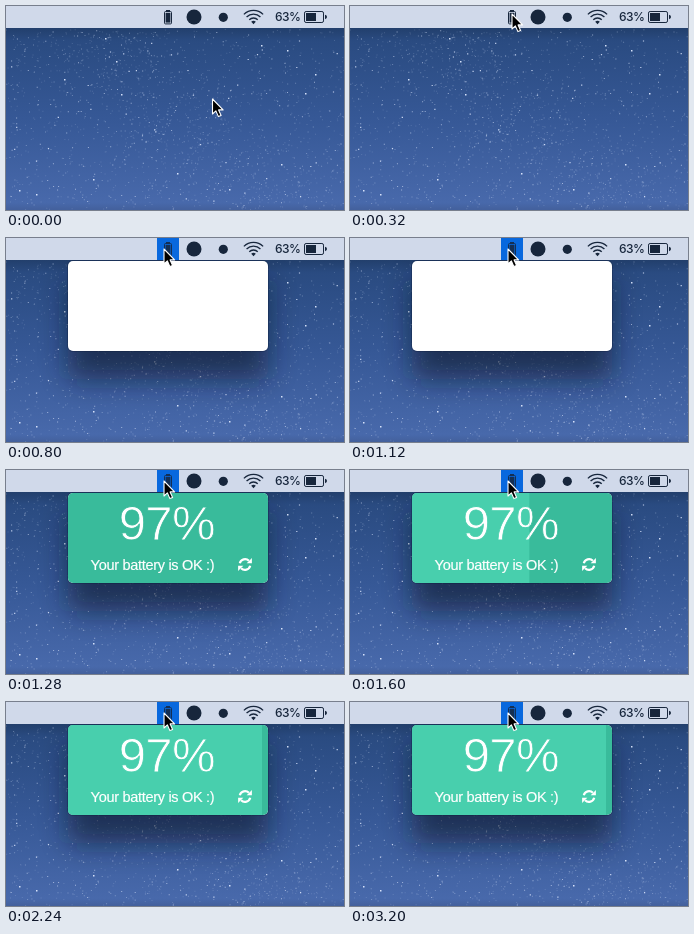
An HTML page for the animation above (3360 ms loop, 338x204 px).

```html
<!DOCTYPE html>
<html lang="en">
<head>
<meta charset="utf-8">
<title>Battery menu</title>
<style>
  html, body { margin: 0; width: 100%; height: 100%; overflow: hidden; background: #365896; }
  svg { display: block; width: 338px; height: 204px; }
  .clock { font: 500 12px Inter, Roboto, sans-serif; letter-spacing: -.5px; }
  .card text { font-family: "Liberation Sans", Arial, sans-serif; fill: #fff; }
  .big { font-size: 49px; letter-spacing: -.7px; text-anchor: middle; stroke: currentColor; stroke-width: .8px; }
  .note { font-size: 14.5px; letter-spacing: -.3px; stroke: #fff; stroke-width: .2px; }
</style>
</head>
<body>
<svg viewBox="0 0 338 204" xmlns="http://www.w3.org/2000/svg">
  <defs>
    <linearGradient id="sky" gradientUnits="userSpaceOnUse" x1="0" y1="22" x2="0" y2="204">
      <stop offset="0" stop-color="#223f6c"/>
      <stop offset=".07" stop-color="#2a4b81"/>
      <stop offset=".5" stop-color="#365896"/>
      <stop offset=".96" stop-color="#4869ab"/>
      <stop offset="1" stop-color="#43609c"/>
    </linearGradient>
    <filter id="blur" x="-50%" y="-80%" width="200%" height="260%">
      <feGaussianBlur stdDeviation="14"/>
    </filter>
    <clipPath id="round"><rect x="62" y="23" width="200" height="90" rx="5"/></clipPath>
    <clipPath id="level"><rect id="bar" x="62" y="23" width="0" height="90"/></clipPath>
    <path id="half" d="M-5.2-1.2A5.4 5.4 0 0 1 3.9-3.7" fill="none" stroke="#fff" stroke-width="2.2"/>
    <path id="tip" d="M6.9-6.4V-1.2H1.7Z" fill="#fff"/>
  </defs>

  <rect width="338" height="204" fill="url(#sky)"/>
  <g id="stars" fill="#dfe9ff"></g>

  <g id="shadow">
    <rect x="62" y="42" width="200" height="99" rx="8" fill="#0a162c" opacity=".6" filter="url(#blur)"/>
    <rect x="61.5" y="22.5" width="201" height="91" rx="5.5" fill="none" stroke="#0b1a36" stroke-opacity=".3"/>
  </g>

  <rect width="338" height="22" fill="#d0d9ea"/>
  <rect id="active" x="151" width="22" height="22" fill="#0868de"/>
  <g fill="#17263c">
    <g id="cell">
      <rect x="158.5" y="5.5" width="7" height="12.4" rx="1" fill="none" stroke="#17263c"/>
      <rect x="160" y="4" width="4" height="1.5"/>
      <rect x="159.6" y="6.8" width="4.8" height="9.8"/>
    </g>
    <circle cx="188" cy="11" r="7.5"/>
    <circle cx="217.3" cy="11.3" r="4.6"/>
    <g id="wifi" fill="none" stroke="#17263c" stroke-width="1.3"></g>
    <path d="M247.5 18.2L245.2 15.8A3.4 3.4 0 0 1 249.8 15.8Z"/>
    <text class="clock" x="269" y="15.4">63%</text>
    <rect x="298.5" y="5.5" width="19" height="11" rx="1.6" fill="none" stroke="#17263c"/>
    <rect x="300" y="7" width="10" height="8"/>
    <path d="M319 8.8q2 .6 2 2.2t-2 2.2Z"/>
  </g>

  <g id="popup" clip-path="url(#round)">
    <rect x="62" y="23" width="200" height="90" fill="#fff"/>
    <g id="content">
      <g color="#39bb9b">
        <g id="card" class="card">
          <rect x="62" y="23" width="200" height="90" fill="currentColor"/>
          <text class="big" x="160.8" y="70">97%</text>
          <text class="note" x="84.6" y="100">Your battery is OK :)</text>
          <g transform="translate(239 94.5)">
            <use href="#half"/><use href="#tip"/>
            <g transform="rotate(180)"><use href="#half"/><use href="#tip"/></g>
          </g>
        </g>
      </g>
      <g color="#48cfad" clip-path="url(#level)"><use href="#card"/></g>
    </g>
  </g>

  <path id="cursor" d="M0 0V15L3.4 11.9 5.9 17.6 8.6 16.4 6.1 10.9H10.6Z"
        fill="#000" stroke="#fff" stroke-width="1.1" stroke-linejoin="round"/>
</svg>
<script>
const LOOP = 3360, STEP = 160;
const OPEN = 800, LOADED = 1280, FILL = 1320, FILL_TIME = 800, FULL = 194;
const trail = [[206.5, 93], [176, 34.5], [162, 8], [158, 11]];
const $ = id => document.getElementById(id);
const show = (id, on) => $(id).setAttribute("visibility", on ? "visible" : "hidden");

function random(seed) {
  return () => (seed = (seed * 16807) % 2147483647) / 2147483647;
}

function addPath(parent, d, opacity = 1) {
  const p = document.createElementNS("http://www.w3.org/2000/svg", "path");
  p.setAttribute("d", d);
  p.setAttribute("opacity", opacity);
  parent.append(p);
}

function drawStars() {
  const rnd = random(4217);
  const dot = (x, y, s) => `M${x.toFixed(1)} ${y.toFixed(1)}h${s}v${s}h-${s}z`;
  // count, dot size, opacity, share gathered along the diagonal band
  const layers = [[1200, 1, .16, .35], [480, 1, .34, .3], [180, 1, .6, .2], [40, 1.2, .85, .1]];
  for (const [count, size, opacity, band] of layers) {
    let d = "";
    for (let i = 0; i < count; i++) {
      let x = rnd() * 338, y = 23 + rnd() * 180;
      if (rnd() < band) x = 40 + y * 1.15 + (rnd() + rnd() - 1) * 110;
      d += dot(x, y, size);
    }
    addPath($("stars"), d, opacity);
  }
  const bright = [[110, 55], [99, 32], [58, 73], [115, 88], [281, 44], [309, 68], [255, 39],
    [299, 87], [275, 158], [171, 167], [30, 188], [223, 183], [13, 184], [87, 173]];
  addPath($("stars"), bright.map(([x, y]) => dot(x, y, 1.5)).join(""), .95);
}

function drawWifi() {
  for (const r of [13.6, 9.8, 6]) {
    const a = r * Math.SQRT1_2;
    addPath($("wifi"), `M${247.5 - a} ${18 - a}A${r} ${r} 0 0 1 ${247.5 + a} ${18 - a}`);
  }
}

// cubic-bezier(.25, .1, .25, 1)
function ease(t) {
  if (t <= 0) return 0;
  if (t >= 1) return 1;
  const curve = (u, a, b) => 3 * u * (1 - u) ** 2 * a + 3 * u * u * (1 - u) * b + u ** 3;
  let lo = 0, hi = 1;
  for (let i = 0; i < 24; i++) {
    const mid = (lo + hi) / 2;
    if (curve(mid, .25, .25) < t) lo = mid; else hi = mid;
  }
  return curve(lo, .1, 1);
}

function render(time) {
  const t = Math.floor((time % LOOP) / STEP) * STEP;
  const open = t >= OPEN;
  const [x, y] = trail[Math.min(t / STEP, trail.length - 1)];
  $("cursor").setAttribute("transform", `translate(${x} ${y})`);
  for (const id of ["shadow", "active", "popup"]) show(id, open);
  // hidden children need an explicit state, since "visible" would override the popup
  $("content").setAttribute("display", t >= LOADED ? "inline" : "none");
  $("cell").setAttribute("opacity", open ? .85 : 1);
  $("bar").setAttribute("width", FULL * ease((t - FILL) / FILL_TIME));
}

drawStars();
drawWifi();
const start = performance.now();
function tick() {
  render(performance.now() - start);
  requestAnimationFrame(tick);
}
tick();
</script>
</body>
</html>
```
